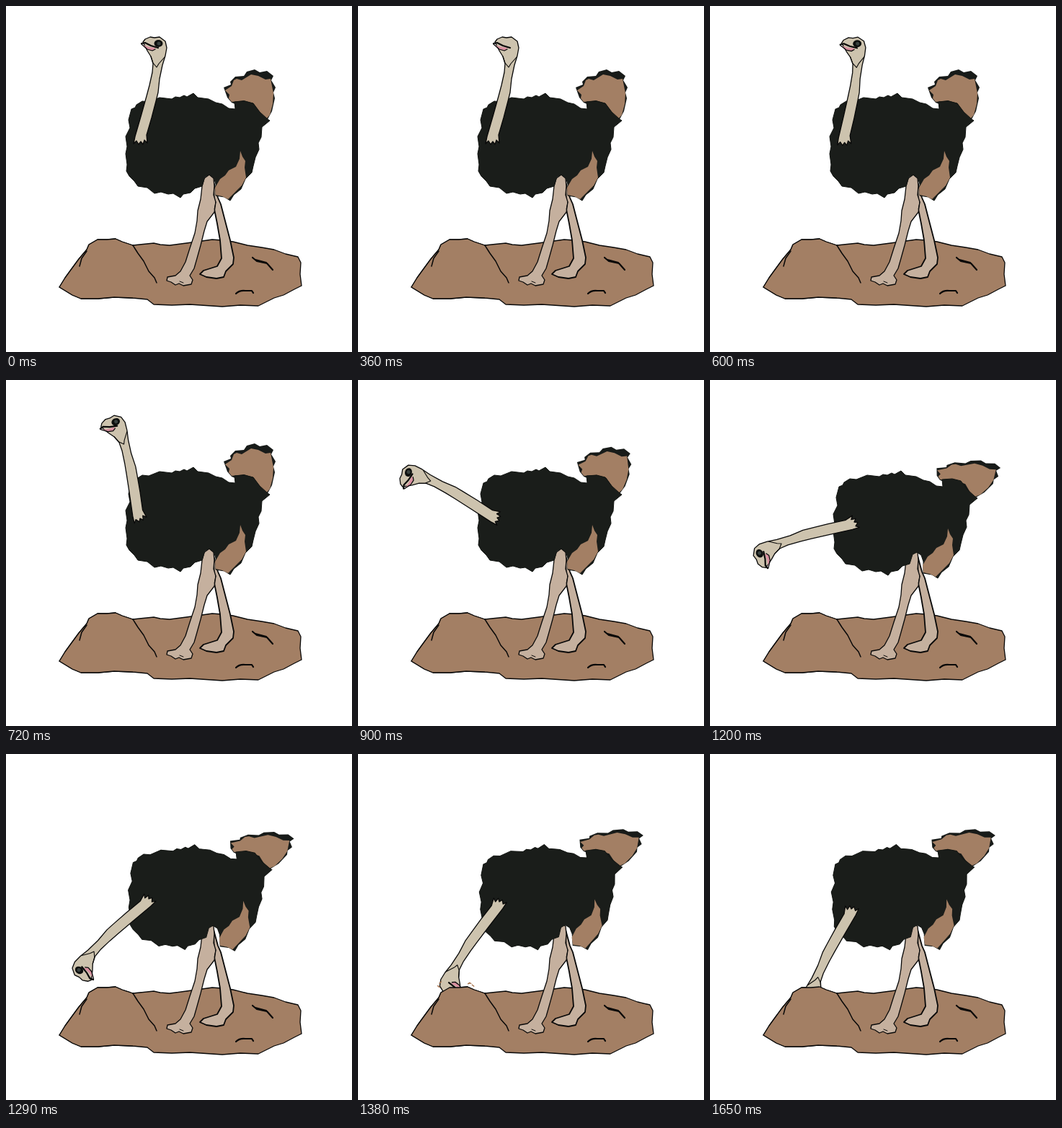
Animation of 480 by 480 pixels, one loop 2.28 s. Source, as an HTML page:

```html
<!DOCTYPE html>
<html lang="en">
<head>
<meta charset="utf-8">
<title>Ostrich</title>
<style>
  html, body { margin: 0; width: 100%; height: 100%; overflow: hidden; background: #fff; }
  svg { display: block; width: 100%; height: 100%; }
  .line { fill: none; stroke: #080808; stroke-linecap: round; stroke-linejoin: round; }
  .skin { stroke: #080808; stroke-width: 1.3; stroke-linejoin: round; }
</style>
</head>
<body>
<svg viewBox="0 0 480 480">
  <defs>
    <clipPath id="moundSide"><rect x="60" y="310" width="118" height="110"/></clipPath>
  </defs>

  <g id="ground">
    <path class="skin" fill="#a37f64" stroke-width="1.5" d="M74 390 L82 377 90 366 101 351 112 338 115 331 127 324 140 324 152 323 161 327 176 332 185 331 205 329 214 331 227 332 250 329 272 326 286 324 300 325 315 327 335 332 355 335 372 338 388 344 405 348 409 356 408 372 410 388 400 393 385 401 372 405 350 416 325 415 300 417 255 414 230 415 205 414 196 407 175 405 150 404 128 406 104 406 92 401Z"/>
    <path class="line" stroke-width="1.5" d="M176 332 L183 343 191 354 198 368 206 377 209 384 M112 340 L105 350 102 361"/>
    <path class="line" stroke-width="2.2" d="M342 349 L348 354 362 357 370 366 M346 352 L361 356 M319 399 Q324 394 332 395 L341 395 343 398"/>
  </g>

  <g class="skin" fill="#c5b09e">
    <path stroke-width="1.8" d="M288 244 L289 282 293 302 297 325 299 350 293 361 274 367 269 372 278 376 292 378 302 376 305 368 315 358 316 349 311 325 305 302 298 275 294 266Z"/>
    <path d="M282 234 L275 239 272 250 270 268 266 284 265 298 262 315 255 336 249 355 242 368 235 374 224 376 223 381 229 383 235 387 240 385 246 388 257 386 259 380 255 374 261 364 265 350 270 332 275 312 279 299 289 286 291 272 288 262 289 250 288 239Z"/>
    <path class="line" stroke-width="1" d="M241 382 L246 384 M289 282 L291 272"/>
  </g>

  <g id="body">
    <g id="tail">
      <path fill="#181b19" d="M302 113 L312 109 311 105 318 98 330 97 334 91 345 88 352 92 362 90 371 97 368 103 374 113 371 120 373 128 369 146 362 159 340 145 313 134 307 127Z"/>
      <path fill="#a37f64" d="M304 117 L313 111 316 103 320 101 327 103 340 95 350 97 360 102 367 101 371 121 370 136 366 151 360 158 343 135 330 131 313 133 309 128 310 123Z"/>
    </g>
    <path fill="#1a1d1a" stroke="#111411" stroke-width="1" d="M179 141 L181 137 189 132 198 133 213 127 230 129 235 126 241 127 247 124 251 126 260 121 266 127 281 129 291 134 300 136 309 142 318 143 317 133 331 132 343 135 352 147 363 157 366 159 355 168 354 182 350 190 351 199 346 210 343 222 341 231 332 240 326 254 316 262 311 270 303 265 291 263 291 247 288 238 282 234 276 237 272 250 262 253 256 259 246 261 242 266 232 260 225 261 215 258 206 260 196 252 183 250 178 243 171 236 167 229 168 220 166 205 168 195 166 181 172 169 170 158 174 143Z"/>
    <path fill="#a37f64" d="M325 201 L328 209 332 215 331 224 333 238 327 249 319 257 308 268 300 264 291 262 290 252 297 240 304 235 309 228 319 223 324 212Z"/>
  </g>

  <g id="neck">
    <path class="skin" fill="#cdc3ae" d="M190 50 L193 46 200 43 206 44 213 43 221 49 223 58 221 69 217 82 213 101 211 120 208 132 202 155 195 179 196 190 192 186 190 192 187 188 184 192 181 187 177 191 179 181 188 150 195 125 199 110 203 92 204 80 201 70 196 62Z"/>
    <path class="line" stroke-width="1.1" d="M201 70 L204 79 209 85 212 80 220 71"/>
    <path fill="#d98fa0" d="M190 54 L199 57 208 58 203 62 197 60Z"/>
    <path class="line" stroke-width="2.2" d="M188 52 L193 51 201 55 211 58"/>
    <path class="line" stroke-width="1.3" d="M188 53 L196 60 203 62 207 60"/>
    <g id="eye">
      <ellipse cx="211.5" cy="52" rx="6" ry="4.9" fill="#0d0f0e"/>
      <circle cx="212" cy="52" r="2.5" fill="#39413f"/>
    </g>
  </g>

  <use href="#ground" clip-path="url(#moundSide)"/>
  <g id="sand" fill="none" stroke="#a8744e" stroke-width="1.4" stroke-linecap="round"></g>
</svg>
<script>
const LOOP = 2280, STEP = 30;
const part = id => document.getElementById(id);
const [body, tail, neck, eye, sand] = ['body', 'tail', 'neck', 'eye', 'sand'].map(part);

const linear = u => u;
const sine = u => (1 - Math.cos(Math.PI * u)) / 2;
const mix = (a, b, u) => a + (b - a) * u;

// Each key is [time, ...values]; values hold before the first and after the last.
function track(keys, t, ease) {
  if (t <= keys[0][0]) return keys[0].slice(1);
  for (let i = 1; i < keys.length; i++) {
    const a = keys[i - 1], b = keys[i];
    if (t < b[0]) {
      const u = ease((t - a[0]) / (b[0] - a[0]));
      return a.slice(1).map((v, k) => mix(v, b[k + 1], u));
    }
  }
  return keys[keys.length - 1].slice(1);
}

const neckTurn = [[540, 0], [1080, -97.5], [1380, -158.5], [1620, -166]];
const neckBase = [[540, 187, 188], [720, 186, 192], [900, 193, 191],
                  [1200, 200, 197], [1380, 196, 205], [1620, 196, 215]];
const bodyPose = [[900, 0, 0, 0], [1080, 5, 5, 0], [1200, 5, 5, 0], [1380, 3, 5.5, -3.6]];
const tailFan = [[810, 1, 0, 0, 1], [1080, 1.19, 0.16, -0.41, 0.7]];

// Grains: start x, sideways travel, peak height, slant
const grains = [[114, -10, 9, 2], [117, -12, 14, -2], [150, 13, 15, 1], [153, 16, 11, 2], [147, 17, 13, -1]]
  .map(spec => {
    const path = document.createElementNS('http://www.w3.org/2000/svg', 'path');
    sand.append(path);
    return { path, spec };
  });

function drawSand(t) {
  const u = (t - 1320) / 180;
  sand.style.display = u > 0 && u < 1 ? '' : 'none';
  for (const { path, spec: [x, dx, h, slant] } of grains) {
    const y = 328 - 4 * h * u * (1 - u) * 0.8;
    path.setAttribute('d', `M${x + dx * u} ${y}l2.5 ${slant}`);
  }
}

function draw(t) {
  const [turn] = track(neckTurn, t, sine);
  const [nx, ny] = track(neckBase, t, linear);
  const [dx, dy, tilt] = track(bodyPose, t, sine);
  const fan = track(tailFan, t, sine);
  neck.setAttribute('transform', `translate(${nx} ${ny}) rotate(${turn}) translate(-187 -188)`);
  body.setAttribute('transform', `translate(${245 + dx} ${195 + dy}) rotate(${tilt}) translate(-245 -195)`);
  tail.setAttribute('transform', `translate(360 158) matrix(${fan.join(' ')} 0 0) translate(-360 -158)`);
  const closed = (t >= 360 && t < 570) || t >= 1320;
  eye.style.display = closed ? 'none' : '';
  drawSand(t);
}

const start = performance.now();
function tick() {
  const t = (performance.now() - start) % LOOP;
  draw(Math.floor(t / STEP) * STEP);
  requestAnimationFrame(tick);
}
draw(0);
requestAnimationFrame(tick);
</script>
</body>
</html>
```
